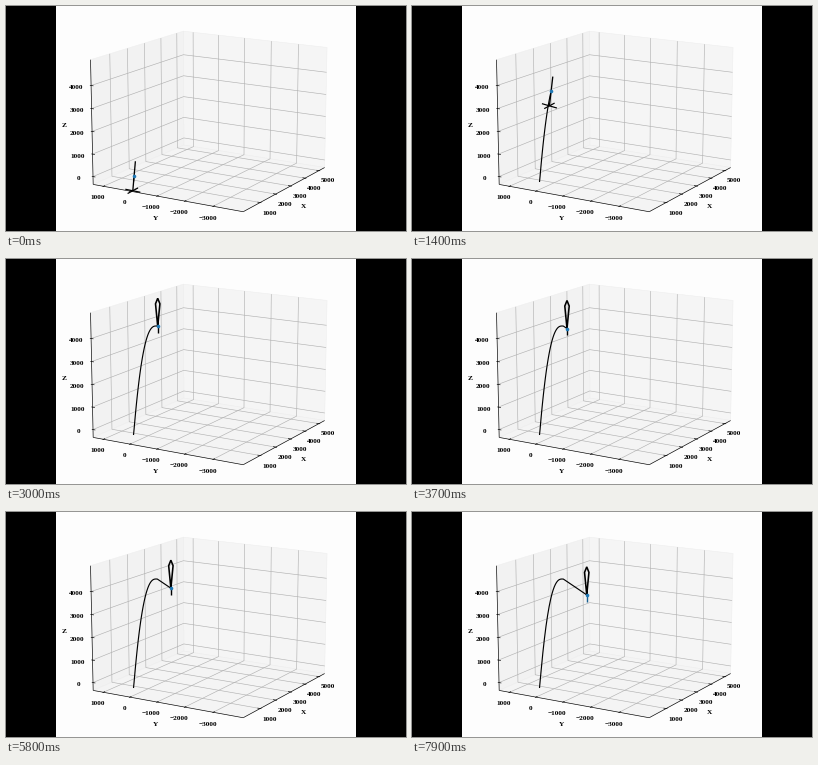
Write a matplotlib script that moves like this. It is 400 by 225 pixels and loops after 8000 ms.

```python
import numpy as np
import matplotlib.pyplot as plt
from matplotlib.animation import FuncAnimation
from matplotlib.patches import Polygon, Rectangle

W, H, DPI = 400, 225, 100
PX = 72 / DPI  # points per pixel
N_FRAMES, STEP = 80, 100
CHUTE = 30  # step at which the parachute opens
BLUE = np.array([0.12, 0.47, 0.71])

fig = plt.figure(figsize=(W / DPI, H / DPI), dpi=DPI, facecolor="#fdfdfd")
ax = fig.add_axes([0, 0, 1, 1])
ax.set(xlim=(-0.5, W - 0.5), ylim=(H - 0.5, -0.5))
ax.axis("off")

# Perspective camera looking at a box centred on the origin
LO = np.array([-50, -4030, -350])
HI = np.array([5420, 1390, 5110])
BOX = np.array([1.19, 1.19, 0.88])
AZIM, ELEV = np.radians([-149.3, 14.2])
DIST, ZOOM, CENTRE = 10, 1434, np.array([204.7, 108.8])
RIGHT = np.array([-np.sin(AZIM), np.cos(AZIM), 0])
EYE = np.array([np.cos(ELEV) * np.cos(AZIM),
                np.cos(ELEV) * np.sin(AZIM), np.sin(ELEV)])
UP = np.cross(EYE, RIGHT)


def project(point):
    p = ((np.asarray(point) - LO) / (HI - LO) - 0.5) * BOX
    return CENTRE + ZOOM * np.array([p @ RIGHT, -(p @ UP)]) / (DIST - p @ EYE)


def line(pts, color="black", width=0.65, z=2):
    return ax.plot(*np.transpose(pts), color=color, lw=width * PX, zorder=z,
                   solid_capstyle="butt", solid_joinstyle="miter")[0]


def label(pos, text):
    ax.text(pos[0], pos[1] + 2.7, text, fontsize=7.3 * PX,
            family="Liberation Serif", weight="bold",
            ha="center", va="baseline", zorder=4)


def swap(point, axis, value):
    moved = np.array(point, float)
    moved[axis] = value
    return moved


FAR = np.array([HI[0], HI[1], LO[2]])  # corner where the three panes meet
NEAR = np.array([LO[0], LO[1], HI[2]])


def draw_axis(i, name, out, ticks, shade):
    """One pane, its grid lines, and the axis with labels pushed along out."""
    out = np.array(out)
    j, k = [n for n in range(3) if n != i]
    side_j, side_k = swap(FAR, j, NEAR[j]), swap(FAR, k, NEAR[k])
    pane = [FAR, side_j, swap(side_j, k, NEAR[k]), side_k]
    ax.add_patch(Polygon([project(p) for p in pane], fc=shade, ec="#eeeeee",
                         lw=0.5 * PX, zorder=1))

    edge = np.where(out > 0, HI, LO)
    tick_dir = swap(np.zeros(3), 0 if i == 1 else 1, 1) * out
    for v in ticks:
        pts = [swap(p, i, v) for p in (side_j, FAR, side_k)]
        line([project(p) for p in pts], color="#b0b0b0", width=0.6)
        at = swap(edge, i, v)
        line([project(at - 90 * tick_dir), project(at + 45 * tick_dir)], z=3)
        label(project(at + 330 * out), str(v).replace("-", "\u2212"))

    line([project(swap(edge, i, v)) for v in (LO[i], HI[i])], z=3)
    middle = swap(edge, i, (LO[i] + HI[i]) / 2)
    label(project(middle + 620 * out), name)


draw_axis(0, "X", (0, -1, -1), range(1000, 5001, 1000), "#f5f5f5")
draw_axis(1, "Y", (-1, 0, -1), range(-3000, 1001, 1000), "#f2f2f2")
draw_axis(2, "Z", (-1, 1, 0), range(0, 4001, 1000), "#f4f4f4")
for left in (0, 350):
    ax.add_patch(Rectangle((left - 0.5, -0.5), 50, H, fc="black", ec="none",
                           zorder=9))


def centre(t):
    """Rocket position: a slowing climb, then a steady drift down."""
    x = 127.6 + 0.787 * min(t, CHUTE) + 0.47 * max(t - CHUTE, 0)
    if t < CHUTE:
        return np.array([x, 66.5 + 103 * abs(1 - t / 28) ** 2.5])
    return np.array([x, 66.8 + 0.318 * (t - CHUTE)])


def nose_offset(t):
    """The rocket tips over, ever faster, as it nears the top."""
    turn = (t / CHUTE) ** 5
    angle = np.radians(5 + 70 * turn)
    return 14.8 * (1 - 0.2 * turn) * np.array([np.sin(angle), -np.cos(angle)])


PATH = np.array([(127, 175.5)] + [centre(k / 2) for k in range(2 * N_FRAMES)])
KITE = np.array([(0, 0), (-2.2, -22.5), (0, -28), (2.2, -22.5), (0, 0)])

start = [(0, 0), (0, 0)]
trail = line(start, width=1.15, z=5)
body = line(start, width=1.3, z=6)
fins = [line(start, width=1.2, z=6) for _ in range(2)]
chute = line(start, width=1.6, z=6)
tail = line(start, width=1.4, z=6)
dot = ax.plot([], [], "o", color=BLUE, ms=3.6 * PX, mew=0, zorder=7)[0]


def place(artist, *pts):
    artist.set_data(*np.transpose(pts))


def update(t):
    c = centre(t)
    place(trail, *PATH[:2 * t + 2])
    place(dot, c)
    falling = t >= CHUTE
    for part in (body, *fins):
        part.set_visible(not falling)
    for part in (chute, tail):
        part.set_visible(falling)
    if falling:
        place(chute, *(c + KITE))
        place(tail, c, c + (0, 6.7))
        tail.set_color(0.8 * BLUE * np.clip((t - 60) / 19, 0, 1))
    else:
        nose = nose_offset(t)
        place(body, c - nose, c + nose)
        bars = np.array([(7.5, 1.5 + 1.5 * t / CHUTE), (5.2, -2.8)])
        for fin, bar in zip(fins, bars):
            place(fin, c - nose - bar, c - nose + bar)
    return [trail, body, *fins, chute, tail, dot]


anim = FuncAnimation(fig, update, frames=N_FRAMES, interval=STEP,
                     repeat=True, repeat_delay=0, blit=False)
plt.show()
```
